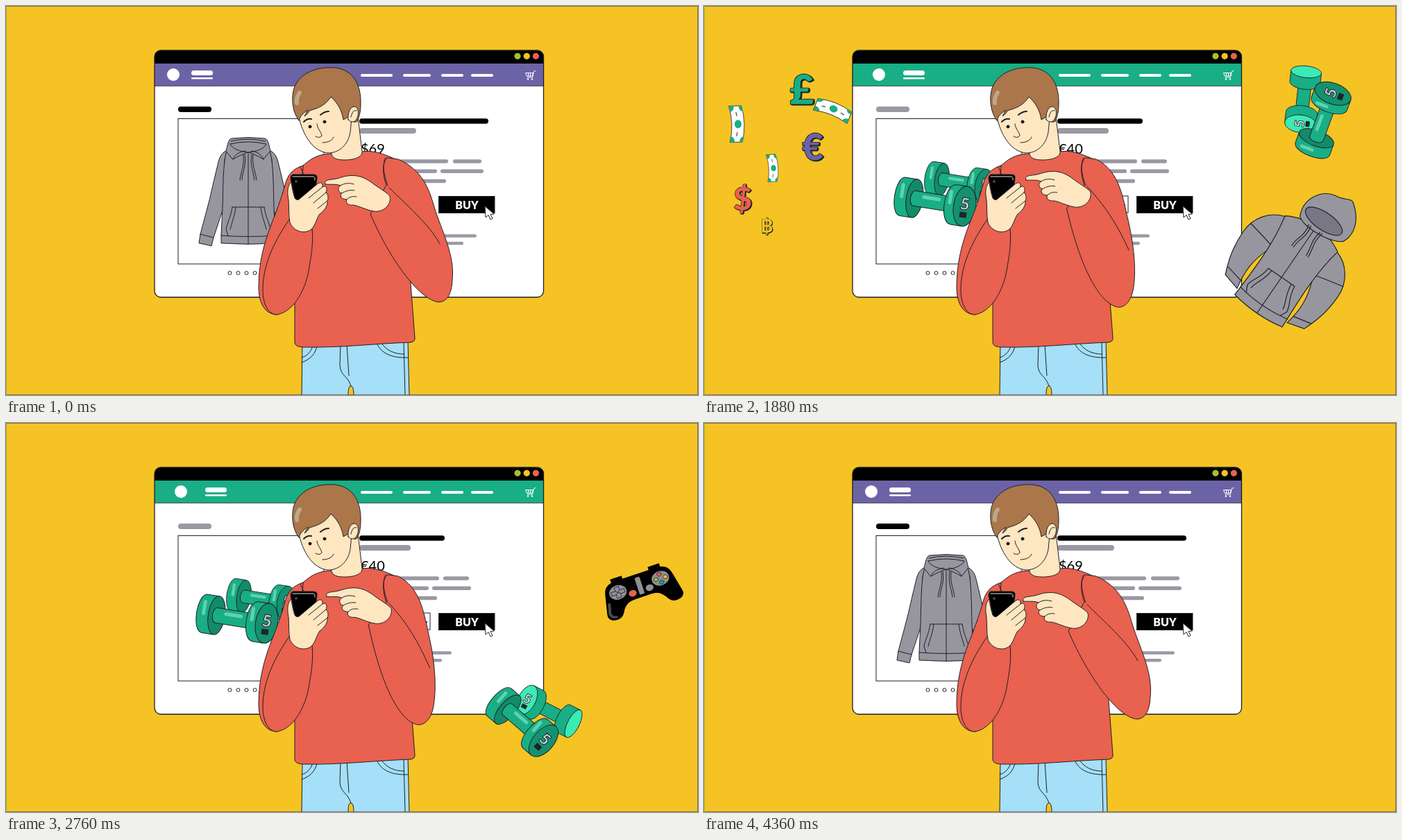
Recreate the animation shown at these times as an HTML page. Size 997 px wide and 561 px high, loop 4400 ms.

```html
<!DOCTYPE html>
<html lang="en">
<head>
<meta charset="utf-8">
<title>Online shopping</title>
<style>
html, body { margin: 0; width: 100%; height: 100%; overflow: hidden; background: #f5c324; }
svg { display: block; width: 997px; height: 561px; }
text { font-family: Lato, "Open Sans", "DejaVu Sans", sans-serif; }
.ink { stroke: #1d2026; stroke-width: 1; stroke-linejoin: round; stroke-linecap: round; }
.line { fill: none; }
.skin { fill: #fee6c1; }
.red { fill: #e9614f; }
.bar { fill: none; stroke-linecap: round; }
.shine { fill: none; stroke: #5fd2b0; stroke-width: 5; }
</style>
</head>
<body>
<svg viewBox="0 0 997 561">
  <defs>
    <clipPath id="frame"><rect x="214" y="64" width="561" height="356" rx="9"/></clipPath>

    <g id="hoodie" class="ink" fill="#97969f" transform="translate(-349 -268)">
      <g id="sleeve">
        <path d="M319 208C311 211 308 217 306 225C301 245 297 263 293 280L280 329L278 342L296 346L299 334L313 292L315 222Z"/>
        <path class="line" d="M280 329L299 334"/>
      </g>
      <use href="#sleeve" transform="matrix(-1 0 0 1 698 0)"/>
      <path d="M318 208C312 230 313 262 312 290L310 331V342Q349 345 388 342V331L386 290C385 262 386 230 380 208Z"/>
      <path class="line" d="M310 331Q349 334 388 331M349 213V343M326 290H372M326 290C324 304 319 312 317 322L320 331M372 290C374 304 379 312 381 322L378 331M331 290C329 305 325 313 323 322M367 290C369 305 373 313 375 322"/>
      <path d="M317 209C319 202 320 192 325 191Q349 188 373 191C378 192 379 202 381 209L371 221C364 217 356 213 349 211C342 213 334 217 327 221Z"/>
      <path d="M323 199Q349 193 375 199C373 205 362 210 349 211C336 210 325 205 323 199Z"/>
      <path class="line" d="M324 195Q349 189 374 195M327 221C330 213 338 210 345 209M371 221C368 213 360 210 353 209M344 214C347 230 340 240 340 251M342 215C344 230 338 240 337 251M354 214C351 230 357 240 358 251M356 215C354 230 360 240 361 251"/>
    </g>

    <g id="puffy" class="ink" fill="#97969f">
      <g id="puff">
        <path d="M-38 -46C-60 -40 -72 -20 -72 0C-72 25 -66 42 -60 57L-38 63C-43 40 -42 22 -33 0Z"/>
        <path class="line" d="M-63 47L-40 52M-70 -14Q-50 -10 -34 -6"/>
      </g>
      <use href="#puff" transform="scale(-1 1)"/>
      <path d="M-40 -46C-32 -10 -34 30 -36 71Q0 78 36 71C34 30 32 -10 40 -46Q20 -58 0 -56Q-20 -58 -40 -46Z"/>
      <path class="line" d="M-36 59Q0 66 36 59M0 -52V74M-20 20H20M-20 20C-21 36 -29 42 -30 52L-26 60M20 20C21 36 29 42 30 52L26 60M-15 20C-16 36 -23 42 -24 52M15 20C16 36 23 42 24 52"/>
      <path d="M-24 -56C-34 -76 -22 -100 0 -103C10 -104 17 -112 21 -108C38 -96 46 -78 39 -62C32 -51 -12 -46 -24 -56Z"/>
      <ellipse cx="4" cy="-68" rx="27" ry="11" fill="#797685"/>
      <path class="line" d="M-6 -54C-2 -38 -10 -32 -9 -20M-9 -54C-5 -38 -13 -32 -12 -20M8 -54C4 -38 10 -32 10 -20M11 -54C7 -38 13 -32 13 -20"/>
    </g>

    <g id="bell" class="ink" fill="#19ae85">
      <path d="M-30 -28H-46C-62 -28 -62 28 -46 28H-30Z"/>
      <ellipse cx="-29" rx="12" ry="28" fill="#138a68"/>
      <path d="M-29 -11H26V11H-29A6 11 0 0 1 -29 -11Z"/>
      <path d="M44 -29H28C10 -29 10 29 28 29H44Z"/>
      <ellipse cx="44" rx="16" ry="29" fill="#149270"/>
      <path class="shine" d="M-48 -17V0M22 -18V-2M-16 -4H6"/>
      <text x="44" y="5" font-size="24" font-weight="900" text-anchor="middle" fill="#cdd4d6">5</text>
      <rect x="39" y="9" width="9" height="7" fill="#20242a"/>
    </g>

    <g id="mint" class="ink" fill="#19ae85">
      <path d="M-22 -11H24V11H-22Z"/>
      <path d="M-44 -27H-25A13 27 0 0 1 -25 27H-44Z"/>
      <ellipse cx="-43" rx="15" ry="27" fill="#3ceab5"/>
      <path d="M46 -26H27A11 26 0 0 0 27 26H46Z"/>
      <ellipse cx="46" rx="10" ry="26" fill="#3ceab5"/>
      <text x="-43" y="6" font-size="22" font-weight="900" text-anchor="middle" fill="#e4f0ee">5</text>
      <rect x="-46" y="9" width="8" height="6" fill="#20242a"/>
    </g>

    <g id="pad" transform="translate(-352 -270)">
      <path d="M307 226h21v7h48v-7h21v8C409 237 412 246 414 257L421 297C423 310 413 315 405 314C398 313 394 308 391 301C384 287 377 284 366 284H338C327 284 320 287 313 301C310 308 306 313 299 314C291 315 281 310 283 297L290 257C292 246 295 237 307 234Z"/>
      <path class="bar" stroke="#4b4a52" stroke-width="5" d="M292 277L288 297Q289 306 297 308"/>
      <circle cx="313" cy="258" r="15.5" fill="#8f8e98"/>
      <circle cx="391" cy="258" r="15.5" fill="#8f8e98"/>
      <path class="ink" fill="#8f8e98" d="M309 246h8v8h8v8h-8v8h-8v-8h-8v-8h8z"/>
      <path class="ink line" d="M309 254l8 8m0 -8l-8 8"/>
      <g class="ink">
        <circle cx="391" cy="249" r="4" fill="#e9614f"/><circle cx="383" cy="258" r="4" fill="#b0bf27"/>
        <circle cx="400" cy="258" r="4" fill="#f5c324"/><circle cx="391" cy="267" r="4" fill="#19ae85"/>
      </g>
      <rect x="348" y="240" width="9" height="38" rx="2" fill="#8f8e98"/>
      <circle cx="337" cy="270" r="7" fill="#e9614f"/><circle cx="368" cy="270" r="7" fill="#8f8e98"/>
    </g>

    <g id="bill" class="ink">
      <path fill="#fff" stroke-width=".8" d="M-26 -8Q0 -15 26 -8V10Q0 3 -26 10Z"/>
      <g fill="#19ae85" stroke="none">
        <path d="M-26 -8l8 -2q-1 6 -8 6zM26 -8l-8 -2q1 6 8 6zM-26 10l8 -2q-1 -5 -8 -5zM26 10l-8 -2q1 -5 8 -5z"/>
        <ellipse cy="-2.5" rx="6" ry="5"/>
      </g>
      <path class="line" d="M-17 0l5 -1M12 -1l5 1"/>
    </g>
  </defs>

  <rect width="997" height="561" fill="#f5c324"/>
  <g id="back"></g>
  <g id="window"></g>
  <g id="mid"></g>

  <g id="man" class="ink">
    <path fill="#a5dff8" d="M427 484L426 562H493C493 552 494 548 497 548C500 548 501 554 501 562H581L579 480Z"/>
    <path class="line" d="M482 488L481 518C482 534 492 532 497 548M491 488L494 533M426 514C438 510 446 502 448 490M426 507C434 505 440 498 442 490M534 486C540 501 556 508 579 507M541 486C548 497 560 502 573 502M573 485L575 561"/>
    <path class="red" d="M468 213C446 214 438 222 428 230L402 290L416 430V484C416 490 420 492 432 492C480 493 530 487 583 485Q590 484 589 478L583 400L575 228C552 216 532 207 513 210Z"/>
    <path class="red" d="M428 230C413 235 406 243 402 258C396 280 388 300 381 318C372 342 364 370 364 405C364 430 374 445 391 445L420 300Z"/>
    <path class="line" d="M424 232L429 243"/>
    <path class="red" id="arm"/>
    <path class="line" id="fold"/>
    <path class="line" d="M547 219C541 228 545 246 550 259"/>
    <path class="skin" d="M466 185L469 214C472 222 481 222 491 222C505 221 514 217 513 209L507 160Z"/>
    <path class="skin" stroke="none" d="M470 150H505V205L480 208Z"/>
    <path class="skin" d="M422 160C427 184 441 210 464 212C480 212 493 200 496 182L500 140L470 115Z"/>
    <path fill="#aa764a" d="M422 165C411 151 411 128 416 116C425 96 448 87 474 89C500 92 512 113 511 142C511 152 509 160 506 166C502 170 496 164 493 160L486 164C484 150 477 139 468 131C461 142 452 147 437 151C436 154 434 156 430 159L435 150C429 154 424 158 422 165Z"/>
    <path class="skin" d="M493 164C492 154 496 145 502 145C510 146 509 163 501 167Q496 168 493 164Z"/>
    <path class="line" d="M497 160C499 151 502 150 505 151M448 170C449 178 454 181 455 187C453 190 449 190 446 188M456 197C464 197 470 194 472 189"/>
    <path class="line" style="stroke-width:2" d="M429 167Q434 162 440 163M453 157Q459 152 465 152"/>
    <path class="bar" style="stroke:#bda78b;stroke-width:6" d="M423 125Q418 132 419 140"/>
    <circle cx="438" cy="174" r="2"/><circle cx="459" cy="167" r="2"/>
    <path class="red" d="M408 308C390 334 370 370 370 409C370 433 380 446 391 445C417 440 432 405 436 382C440 358 443 343 441 320Z"/>
    <path fill="#000" d="M414 243H443Q449 243 448 249L446 264L428 279Q418 282 416 276L410 249Q410 243 414 243Z"/>
    <path class="line" style="stroke:#fff;stroke-width:.9" d="M413 246H442Q446 246 445 251"/>
    <circle cx="418" cy="253" r="2" fill="#555"/>
    <path class="skin" d="M411 254C405 259 405 269 407 280C408 290 407 302 409 312C414 325 430 330 440 322C446 316 448 305 452 300C458 296 464 288 463 281C465 277 464 271 461 269C464 262 460 258 456 261C457 254 452 253 447 258L422 279C419 280 417 279 416 277C413 268 412 261 411 254Z"/>
    <path class="line" d="M456 261L436 277M461 269L443 284M463 281L449 292"/>
    <g id="hand">
      <path class="skin" d="M460 257C458 251 464 251 470 250C480 249 484 246 492 245C506 243 516 247 526 254C536 262 548 268 553 274C556 287 543 298 530 296C518 294 508 288 500 287C494 288 488 284 491 279C483 279 480 273 484 270C477 268 478 261 482 259C474 256 466 258 460 257Z"/>
      <path class="line" d="M482 259C488 255 495 255 501 257M484 270C490 266 497 265 502 266M491 279C495 275 500 274 505 275"/>
    </g>
  </g>
  <g id="top"></g>
  <path fill="none" stroke="#6b5a4a" stroke-opacity=".75" d="M0 .5H997M996.5 0V561M0 560.5H997"/>
  <path stroke="#8fb52c" d="M.5 0V561"/>
</svg>

<script>
const LOOP = 4400, STEP = 40;
const BLACK = '#000', WHITE = '#fff', GREY = '#9a99a3';
const { sin, cos, exp, min, max, PI } = Math;
const $ = id => document.getElementById(id);

const bar = (x1, x2, y, w, color) =>
  `<path class="bar" stroke="${color}" stroke-width="${w}" d="M${x1 + w / 2} ${y}H${x2 - w / 2}"/>`;
const place = (x, y, r = 0, s = 1) => `translate(${x} ${y}) rotate(${r}) scale(${s})`;
const put = (id, ...at) => `<g transform="${place(...at)}"><use href="#${id}"/></g>`;
const dot = (x, r) => `<circle cx="${x}" cy="99" r="${r}" fill="#fff"/>`;

// ends: right ends of the text bars; more: a second bar on the same row
const pages = [
  { color: '#6c63a7', ink: WHITE, mark: dot(241, 9), name: [267, 298], title: BLACK,
    price: '$69', heads: [695, 591], ends: [637, 621, 634], more: [[644, 685], [626, 688]], foot: [678, 659, 623],
    item: put('hoodie', 349, 268) },
  { color: '#19ae85', ink: WHITE, mark: dot(252, 9), name: [287, 318], title: GREY,
    price: '€40', heads: [632, 583], ends: [624, 609, 621], more: [[630, 667], [614, 670]], foot: [642, 628],
    item: put('bell', 367, 254, 9, .85) + put('bell', 332, 282, 9) },
  { color: '#b0bf27', ink: BLACK, mark: '<rect x="242" y="92" width="12" height="14" rx="4"/>', name: [263, 318], title: BLACK,
    price: '£55.8', heads: [640, 572], ends: [608, 595, 605], more: [[613, 645], [599, 647]], foot: [678, 659, 623],
    item: put('pad', 352, 270) }
];

function pageMarkup(p) {
  const nav = [[511, 557], [572, 612], [627, 659], [670, 702]];
  return `<g class="page">
    <rect x="214" y="83" width="561" height="32" fill="${p.color}"/>
    <path stroke="#1d2026" stroke-width=".8" d="M214 115.4H775"/>
    ${p.mark}${bar(...p.name, 96.5, 7, p.ink)}${bar(...p.name, 104.2, 2.6, p.ink)}
    ${nav.map(n => bar(...n, 100, 4, p.ink)).join('')}
    <path class="bar" stroke="${p.ink}" d="M763 93.5L760.5 94.5L758.5 103H751M749 96.5H759.5L758 101H750.5ZM752.5 96.5V101M755.5 96.5V101"/>
    <circle cx="752" cy="105.5" r="1.2" fill="${p.ink}"/><circle cx="758" cy="105.5" r="1.2" fill="${p.ink}"/>
    ${bar(248, 296, 149, 8, p.title)}
    ${p.item}
    ${bar(509, p.heads[0], 166, 7.5, BLACK)}${bar(509, p.heads[1], 180, 8, GREY)}
    <text x="511" y="213" font-size="20">${p.price}</text>
    ${p.ends.map((x, i) => bar(511, x, 224 + 14.2 * i, 5.5, GREY)).join('')}
    ${p.more.map((m, i) => bar(...m, 224 + 14.2 * i, 5.5, GREY)).join('')}
    ${p.foot.map((x, i) => bar(511, x, 331.5 + 10.8 * i, 4.5, GREY)).join('')}
    <rect x="540" y="274" width="71" height="24" fill="#fff" stroke="#1d2026"/>
    <path stroke="#000" stroke-width="1.6" d="M599 287H607M603 283V291"/>
    <rect class="buy" x="623.5" y="274.5" width="80.5" height="24" stroke="#1d2026"/>
    <text class="label" x="664" y="292.5" font-size="16" font-weight="900" text-anchor="middle">BUY</text>
  </g>`;
}

$('window').innerHTML = `
  <g clip-path="url(#frame)">
    <rect x="214" y="64" width="561" height="356" fill="#fff"/>
    <rect x="214" y="64" width="561" height="19"/>
    <rect x="248" y="162.5" width="210" height="209.5" fill="none" stroke="#1d2026"/>
    ${pages.map(pageMarkup).join('')}
  </g>
  <rect x="214" y="64" width="560.5" height="356" rx="9" fill="none" stroke="#1d2026" stroke-width="1.3"/>
  ${['#a5bf2e', '#f5c324', '#e9614f'].map((c, i) => `<circle cx="${737 + 13.2 * i}" cy="72.3" r="4.6" fill="${c}"/>`).join('')}
  ${[0, 1, 2, 3, 4].map(i => `<circle cx="${322.5 + 12 * i}" cy="385" r="2.5" fill="#fff" stroke="#1d2026"/>`).join('')}
  <path class="ink" fill="#fff" d="M690 289L691 305L695 301.5L698 308L701 306.5L698 300.5L703 300Z"/>`;

const smooth = (t, a, b) => {
  const u = max(0, min(1, (t - a) / (b - a)));
  return u * u * (3 - 2 * u);
};
const bezier = (v, a, b, c, d) => {
  const w = 1 - v;
  return w * w * w * a + 3 * w * w * v * b + 3 * w * v * v * c + v * v * v * d;
};

// Products leave from behind the window, swing round on the right and shrink towards the buyer
function flyHome(q, { size, turn, spin }) {
  const v = q + .15 * sin(PI * q ** .7);
  return {
    layer: q < .22 ? 'back' : 'mid',
    x: bezier(v, 690, 1010, 1000, 585), y: bezier(v, 110, 60, 440, 462),
    r: turn + spin * q, s: size * min(1, q / .13, (1 - q) / .07)
  };
}

// Money sweeps out to the left, then returns behind the window
function pay(v, { from, lane, size, tilt }) {
  const swing = sin(PI * v), [x, y, reach] = from;
  return {
    layer: v < .5 ? 'top' : 'back',
    x: x + (260 - x) * v - reach * swing, y: y + (140 - y) * v + lane * swing,
    r: tilt * (swing - .1), s: size * min(1, v / .03)
  };
}

const product = (art, i, size, turn, spin) =>
  ({ art, path: flyHome, start: 1000 + 640 * i, span: 1500, size, turn, spin });
const bill = (start, span, lane, size) =>
  ({ art: put('bill', 0, 0), path: pay, from: [420, 250, 300], tilt: 110, start, span, lane, size });
const coin = (sign, color, start, lane, size) => ({
  art: `<g font-size="54" font-weight="900" text-anchor="middle" stroke="#1d2026" stroke-width=".8">
    <text x="1.5" y="21" fill="#1d2026">${sign}</text><text y="20" fill="${color}">${sign}</text></g>`,
  path: pay, from: [330, 380, 250], tilt: 0, start, span: 930, lane, size
});

const flyers = [
  product(put('puffy', 0, 0), 0, 1.15, -70, 178),
  product(put('mint', 11, -20, -14, .9) + put('bell', -10, 20), 1, .94, -100, 189),
  product('<g transform="scale(1.18 .95)"><use href="#pad"/></g>', 2, .7, -30, 36),
  bill(1040, 930, 0, 1), bill(1110, 1200, -10, 1), bill(1550, 950, 25, .75),
  coin('€', '#6c63a7', 1090, 60, 1), coin('£', '#19ae85', 1114, -120, 1.12),
  coin('$', '#e9614f', 1480, 0, .85), coin('฿', '#f5c324', 1570, 20, .5)
];
for (const f of flyers) {
  f.node = document.createElementNS('http://www.w3.org/2000/svg', 'g');
  f.node.innerHTML = f.art;
}

const presses = [960, 2240, 3560], HOLD = 440;
const views = [...document.querySelectorAll('.page')];

function drawPage(t) {
  const shown = t < 1520 || t >= 4040 ? 0 : t < 2960 ? 1 : 2;
  const pressed = presses.some(p => t >= p && t < p + HOLD);
  views.forEach((view, i) => {
    view.style.display = i === shown ? '' : 'none';
    view.querySelector('.buy').setAttribute('fill', pressed ? pages[i].color : BLACK);
    view.querySelector('.label').setAttribute('fill', pressed ? pages[i].ink : WHITE);
  });
}

// The elbow swings in (k = 1), rocks gently, then swings out again
function drawArm(t) {
  const rock = cos(2 * PI * (t - 1120) / 1320);
  const active = smooth(t, 640, 900) * (1 - smooth(t, 4000, 4280));
  const k = active * (.9 + .1 * rock);
  const tap = presses.reduce((sum, p) => sum + exp(-(((t - p + 40) / 80) ** 2)), 0);
  $('arm').setAttribute('d', `M565 221C${600 - 5 * k} 236 ${610 - 9 * k} ${265 + 7 * k} ${617 - 9 * k} ${290 + 16 * k}
    C${628 - 10 * k} ${325 + 25 * k} ${647 - 29 * k} ${360 + 30 * k} ${643 - 31 * k} ${395 + 20 * k}
    C${642 - 35 * k} ${418 + 14 * k} ${634 - 37 * k} ${427 + 10 * k} ${623 - 33 * k} ${427 + 9 * k}
    C${597 - 35 * k} ${424 + 6 * k} ${555 - 17 * k} ${370 + 5 * k} ${525 - 3 * k} ${300 - 10 * k}
    L548 258C542 242 542 226 549 219Z`);
  $('fold').setAttribute('d', `M552 ${262 - 2 * k}C${575 + 3 * k} ${285 + 3 * k} ${610 - 18 * k} 315 ${625 - 16 * k} ${343 + 11 * k}`);
  $('hand').setAttribute('transform', `translate(${active * (2 - 2 * rock - 14 * tap)} ${-7.5 * k})`);
}

function drawFlyer(f, t) {
  const u = (t - f.start) / f.span, on = u > 0 && u < 1;
  f.node.style.display = on ? '' : 'none';
  if (!on) return;
  const { layer, x, y, r, s } = f.path(u, f);
  if (f.node.parentNode !== $(layer)) $(layer).appendChild(f.node);
  f.node.setAttribute('transform', place(x, y, r, s));
}

const start = performance.now();
function tick() {
  const t = Math.floor((performance.now() - start) % LOOP / STEP) * STEP;
  drawPage(t);
  drawArm(t);
  flyers.forEach(f => drawFlyer(f, t));
  requestAnimationFrame(tick);
}
tick();
</script>
</body>
</html>
```
